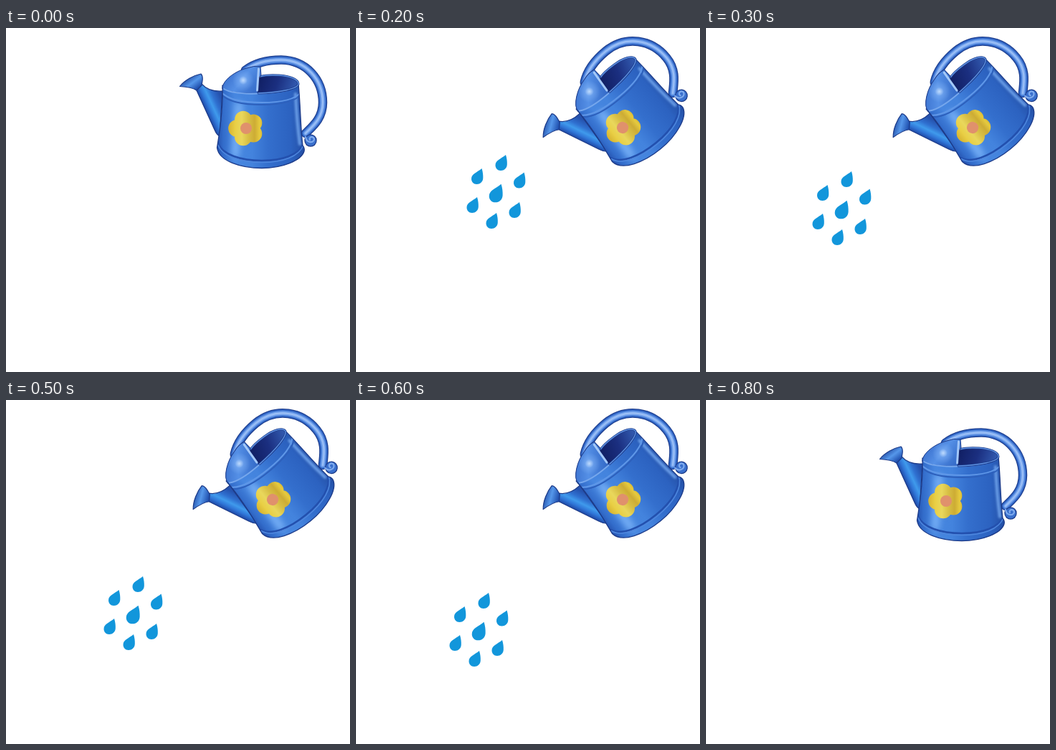
An HTML page with a canvas for the animation above (900 ms loop, 480 px wide and 480 px high).

```html
<!DOCTYPE html>
<html lang="en">
<head>
<meta charset="utf-8">
<title>Watering can</title>
<style>
html, body { margin: 0; width: 100%; height: 100%; overflow: hidden; background: #fff; }
canvas { display: block; width: 100vw; height: 100vh; }
</style>
</head>
<body>
<canvas id="stage" width="480" height="480"></canvas>
<script>
const ctx = document.getElementById('stage').getContext('2d');
const LOOP = 900, STEP = 100;
const OUTLINE = '#1c3a88';

function linear(x0, y0, x1, y1, ...stops) {
  const g = ctx.createLinearGradient(x0, y0, x1, y1);
  stops.forEach(([at, color]) => g.addColorStop(at, color));
  return g;
}

function glow(x, y, r, color, alpha) {
  const g = ctx.createRadialGradient(x, y, 0, x, y, r);
  g.addColorStop(0, `rgba(${color},${alpha})`);
  g.addColorStop(1, `rgba(${color},0)`);
  return g;
}

function disc(x, y, r) {
  const path = new Path2D();
  path.arc(x, y, r, 0, 7);
  return path;
}

function fill(path, style) {
  ctx.fillStyle = style;
  ctx.fill(path);
}

function stroke(path, color, width) {
  ctx.strokeStyle = color;
  ctx.lineWidth = width;
  ctx.stroke(path);
}

// A round tube: nested strokes from the dark rim to the light core
function tube(path, width) {
  stroke(path, OUTLINE, width);
  stroke(path, '#2c5fbe', width * 0.84);
  stroke(path, '#4a80d9', width * 0.62);
  stroke(path, '#78a6ee', width * 0.4);
  stroke(path, '#9cc0f6', width * 0.16);
}

const handle = new Path2D('M334 59 C348 48 367 44.500 384 44.500 C419 45 442 72 442 104 C442 126 428 137 418 147');
const curl = new Path2D('M418 152 C419 161 430 161 430 155 C429 150 422 152 424 156');
const spout = new Path2D('M265 85 L273 78 C279 85 287 89 302 88 L298 151 Q294 149 291 142 Z');
const rose = new Path2D('M242.500 81.500 C249 73 262 66 272 64 Q275 67 274 74 L273 80 L266 87 C260 83 252 82 242.500 81.500 Z');
const body = new Path2D('M302 80 C303 110 299 140 294.500 167 C297 186 328 195.500 357 195.500 C386 195.500 412 185 416 172 Q417 168 414 164 C411 140 411 110 408 78 C404 87 380 91 355 91 C330 91 308 88 302 80 Z');
const shine = new Path2D('M325 108 C324 130 322 150 320 176');
const edgeShine = new Path2D('M404 92 C405 115 407 140 410 162');
const rimBand = new Path2D('M301 93 C310 103 332 107 357 107 C382 107 403 103 411 93');
const baseBand = new Path2D('M296 161 C302 177 328 185 357 185 C386 185 409 177 415 161');
const opening = new Path2D('M352 70 C356 66 370 65.500 381 66 C397 67 407 72 408 78 C407 86 381 91 351 91 Z');
const rim = new Path2D('M356 67.500 C362 65.500 372 65.500 381 66 C397 67 408 72 408 78 C407 85 382 90 352 91');
const cover = new Path2D('M302 84 C302 73 320 60 336 56 Q346 52 355 54 L356 66 L352 70 L351 91 C334 92 312 91 302 84 Z');
const lip = new Path2D('M352.500 57 L350.500 87');
const front = new Path2D('M304 85 C314 91 334 92 350 91.500');

function flower(x, y) {
  const petals = new Path2D();
  for (let k = 0; k < 5; k++) {
    const a = Math.PI * (1 + k * 0.4);
    petals.addPath(disc(x + 12.8 * Math.cos(a), y + 12.8 * Math.sin(a), 12));
  }
  fill(petals, linear(x - 25, y, x + 25, y,
    [0, '#d6b230'], [0.2, '#e9cf45'], [0.38, '#e9d75c'], [0.56, '#d8bf45'],
    [0.74, '#cdac34'], [0.88, '#e6ca3e'], [1, '#d3b032']));
  fill(disc(x, y, 8), '#e0916c');
}

function drawBody() {
  fill(body, linear(295, 0, 416, 0,
    [0, '#2553b0'], [0.07, '#336dcb'], [0.2, '#4787e0'], [0.4, '#4383dd'],
    [0.58, '#346fcd'], [0.85, '#2c62c0'], [1, '#2450a6']));
  ctx.save();
  ctx.clip(body);
  ctx.filter = 'blur(4px)';
  stroke(shine, '#74adf4', 11);
  ctx.filter = 'blur(1.5px)';
  stroke(edgeShine, '#6b9fe8', 4);
  ctx.filter = 'none';
  stroke(baseBand, '#2350ae', 2.5);
  ctx.translate(0, 2.5);
  stroke(baseBand, '#4d86dd', 1.5);
  ctx.translate(0, -2.5);
  stroke(rimBand, '#2d60bc', 2);
  ctx.translate(0, -3);
  stroke(rimBand, '#5f97e8', 2);
  ctx.restore();
  stroke(body, OUTLINE, 1.3);
}

function drawCan() {
  ctx.lineCap = ctx.lineJoin = 'round';
  tube(handle, 12.5);
  fill(disc(425, 157, 8.7), OUTLINE);
  fill(disc(425, 157, 7.5), '#3a70cd');
  stroke(curl, '#7fabee', 2.2);

  fill(spout, linear(279, 115, 303, 104,
    [0, '#1f4ba8'], [0.2, '#2f74d6'], [0.42, '#3f9aec'], [0.66, '#2f70d0'], [1, '#2552ae']));
  stroke(spout, OUTLINE, 1.2);
  fill(rose, linear(252, 70, 264, 86, [0, '#2450a8'], [0.5, '#5597ea'], [1, '#2354b2']));
  stroke(rose, OUTLINE, 1.2);

  drawBody();

  fill(opening, linear(352, 68, 405, 86, [0, '#101e62'], [0.5, '#1b2f80'], [1, '#335cb2']));
  stroke(rim, OUTLINE, 3);
  stroke(rim, '#5f92e2', 1.4);

  fill(cover, linear(306, 66, 346, 96, [0, '#3a70cd'], [0.45, '#5590e6'], [1, '#3268c6']));
  fill(cover, glow(331, 73, 15, '150,196,255', 0.6));
  fill(cover, glow(331, 73, 6, '205,228,255', 0.8));
  stroke(cover, OUTLINE, 1);
  stroke(lip, '#a3c8f8', 3);
  stroke(front, '#76a8ee', 2);

  flower(335, 140);
}

const drop = new Path2D('M6.500 -13.500 C8 -9 8.500 -4 8.300 0 C8 5.500 4 8.500 -.5 8.500 C-5 8.500 -8 5 -8 1 C-8 -6 0 -8 6.500 -13.500 Z');
// x, y, scale
const drops = [
  [208.5, 167.5, 1], [175, 186.5, 1], [234, 192, 1], [201, 210.5, 1.16],
  [168.5, 226.5, 1], [227.5, 233.5, 1], [195.5, 248.5, 1]
];

function drawDrops(step) {
  for (const [x, y, s] of drops) {
    ctx.save();
    ctx.translate(x - 6 * step, y + 23 * step);
    ctx.scale(s, s);
    fill(drop, '#1296db');
    ctx.restore();
  }
}

function render(now) {
  const step = Math.floor((now % LOOP) / STEP);
  const pouring = step > 0 && step < 8;
  ctx.fillStyle = '#fff';
  ctx.fillRect(0, 0, 480, 480);
  ctx.save();
  if (pouring) {
    ctx.translate(372, 139);
    ctx.rotate(-39.3 * Math.PI / 180);
    ctx.scale(1.02, 1.02);
    ctx.translate(-335, -140);
  } else if (step === 8) {
    ctx.translate(0, 1);
  }
  drawCan();
  ctx.restore();
  if (pouring) drawDrops(step - 1);
}

const start = performance.now();
function tick() {
  render(performance.now() - start);
  requestAnimationFrame(tick);
}
tick();
</script>
</body>
</html>
```
